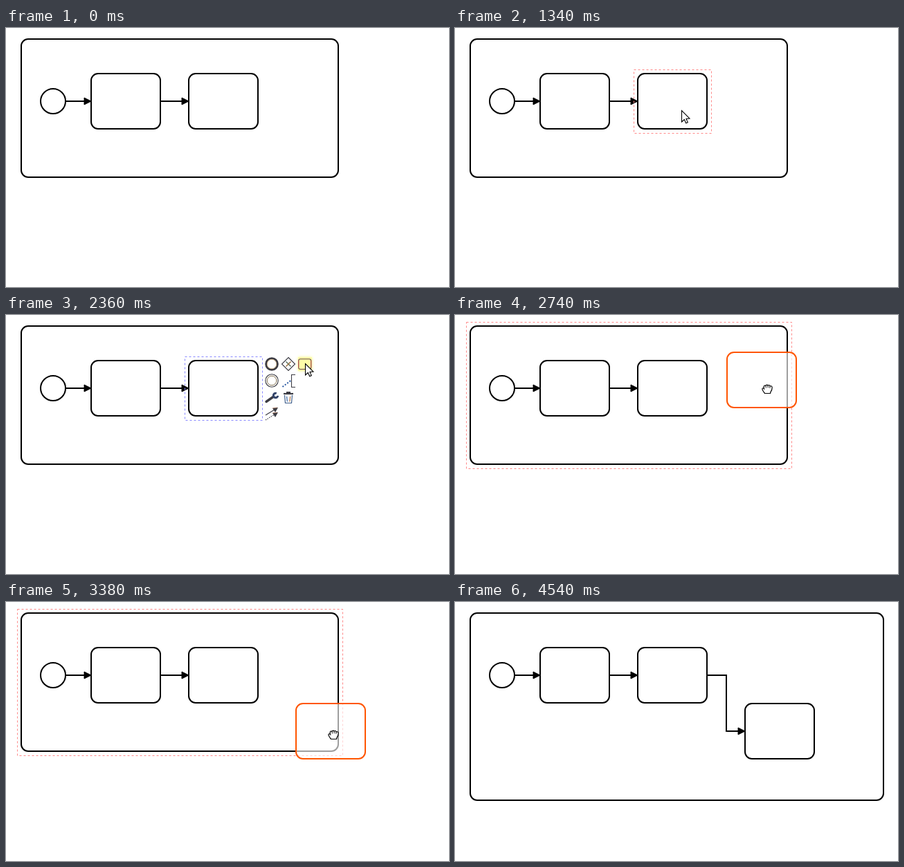
These frames come from a looping animation (640 px wide and 375 px high, 5.82 s). An HTML page with a canvas:

```html
<!DOCTYPE html>
<html lang="en">
<head>
<meta charset="utf-8">
<title>Diagram editing</title>
<style>
html, body { margin: 0; width: 100%; height: 100%; overflow: hidden; background: #fff; }
canvas { display: block; }
</style>
</head>
<body>
<canvas id="stage" width="640" height="375"></canvas>
<script>
const ctx = document.getElementById('stage').getContext('2d');
const LOOP = 5820, SELECT = 1720, DRAG = 2580, DROP = 3800, CLEAR = 4540;
const INK = '#3c3c44', RED = '#ff8888', BLUE = '#8888ff', ORANGE = '#ff5500';

const box = (x, y, w, h) => ({ x, y, w, h });
const first = box(123, 66, 100, 80);
const second = box(264, 66, 100, 80);
const added = box(419, 147, 100, 80);
const smallFrame = box(22, 16, 458, 200);
const bigFrame = box(22, 16, 597, 271);

// Pointer waypoints: time, x, y, eased arrival
const track = [
  [980, 24, 288], [1540, 348, 107, true], [1720, 348, 107],
  [2200, 436, 74, true], [2280, 435, 73], [2320, 433, 71], [2360, 432, 70],
  [2500, 432, 70], [2540, 433, 72], [2620, 436, 78], [2740, 447, 102],
  [2820, 457, 125], [2900, 464, 147], [2940, 465, 158], [3060, 465, 175],
  [3200, 467, 183], [3340, 469, 187], [3900, 469, 187], [4500, 490, 364, true]
];
// Pointer samples are 40 ms apart, counted from the start of each gesture
const gestures = [980, 1720, 2540, 3800, 3900];

function sampleTime(t) {
  let start = 0;
  for (const g of gestures) if (t >= g) start = g;
  if (start === 3800) return start;
  return start + Math.floor((t - start) / 40) * 40;
}

function ease(u) {
  const v = 1 - Math.pow(1 - u, 1.8);
  return v * v * (3 - 2 * v);
}

function pointer(t) {
  let i = 1;
  while (i < track.length - 1 && track[i][0] < t) i++;
  const a = track[i - 1], b = track[i];
  let u = Math.min(1, Math.max(0, (t - a[0]) / (b[0] - a[0])));
  if (b[3]) u = ease(u);
  return {
    x: Math.round(a[1] + (b[1] - a[1]) * u),
    y: Math.round(a[2] + (b[2] - a[2]) * u)
  };
}

const inside = (p, b) => p.x >= b.x && p.x <= b.x + b.w && p.y >= b.y && p.y <= b.y + b.h;

function trace(points, close) {
  ctx.beginPath();
  points.forEach(([x, y], i) => i ? ctx.lineTo(x, y) : ctx.moveTo(x, y));
  if (close) ctx.closePath();
}

function line(points, color = '#000', width = 2, dash = []) {
  ctx.strokeStyle = color;
  ctx.lineWidth = width;
  ctx.setLineDash(dash);
  trace(points);
  ctx.stroke();
  ctx.setLineDash([]);
}

function ring(x, y, r, width, color = '#000') {
  ctx.strokeStyle = color;
  ctx.lineWidth = width;
  ctx.beginPath();
  ctx.arc(x, y, r, 0, Math.PI * 2);
  ctx.stroke();
}

function rounded(b, fill, stroke = '#000', width = 2, r = 10) {
  ctx.beginPath();
  ctx.roundRect(b.x, b.y, b.w, b.h, r);
  if (fill) {
    ctx.fillStyle = fill;
    ctx.fill();
  }
  ctx.strokeStyle = stroke;
  ctx.lineWidth = width;
  ctx.stroke();
}

function outline(b, color) {
  ctx.strokeStyle = color;
  ctx.lineWidth = 1;
  ctx.setLineDash([3, 3]);
  ctx.strokeRect(b.x - 5.5, b.y - 5.5, b.w + 12, b.h + 12);
  ctx.setLineDash([]);
}

function flow(points) {
  line(points);
  const [x, y] = points[points.length - 1];
  trace([[x - 10, y - 5], [x, y], [x - 10, y + 5]], true);
  ctx.fillStyle = '#000';
  ctx.fill();
  ctx.lineWidth = 1;
  ctx.stroke();
}

function smallArrow(y, dash) {
  line([[375, y], [388, y - 8]], INK, 1.2, dash);
  trace([[393, y - 11], [385, y - 10], [389, y - 4]], true);
  ctx.fillStyle = INK;
  ctx.fill();
  line([[385, y - 10], [392, y - 11]], '#a66b4a', 0.7);
}

function wrench() {
  ctx.lineCap = 'round';
  line([[376, 125.5], [386, 118.5]], INK, 3.4);
  ctx.lineCap = 'butt';
  ctx.strokeStyle = '#34456b';
  ctx.lineWidth = 3;
  ctx.beginPath();
  ctx.arc(389.5, 116.5, 3.2, 0.1, 5.1);
  ctx.stroke();
}

function trash() {
  line([[401, 114], [415, 114]], INK, 2.2);
  line([[405, 112], [411, 112]], INK, 2);
  line([[402.5, 116], [403.5, 127.5], [412.5, 127.5], [413.5, 116]], '#41608c', 1.2);
  line([[405.6, 118], [406.4, 125.5]], '#3768a8', 1.2);
  line([[410.6, 118], [409.8, 125.5]], '#b8723c', 1.2);
}

// Icons are laid out beside the second task; other owners shift them
function contextPad(owner, p) {
  const dx = owner.x - second.x, dy = owner.y - second.y;
  ctx.save();
  ctx.translate(dx, dy);
  const col = Math.floor((p.x - dx - 372) / 24);
  const row = Math.floor((p.y - dy - 59) / 24);
  const counts = [3, 2, 2, 1];
  if (col >= 0 && row >= 0 && row < 4 && col < counts[row]) {
    ctx.fillStyle = '#ffffa8';
    ctx.shadowColor = '#ffff90';
    ctx.shadowBlur = 4;
    ctx.fillRect(374 + col * 24, 61 + row * 24, 20, 20);
    ctx.shadowBlur = 0;
    ctx.shadowColor = 'transparent';
  }
  ring(384, 71, 8.4, 2.8, INK);
  ring(384, 71, 6.7, 0.6, '#c9a060');

  trace([[408, 61.5], [417.5, 71], [408, 80.5], [398.5, 71]], true);
  ctx.strokeStyle = INK;
  ctx.lineWidth = 1.1;
  ctx.stroke();
  line([[404.5, 67.5], [411.5, 74.5]], '#557060', 1.4);
  line([[411.5, 67.5], [404.5, 74.5]], '#9a7040', 1.4);

  rounded(box(422.7, 63.7, 18, 14.8), null, '#684848', 1.1, 2.5);
  line([[422.7, 66], [422.7, 76]], '#b84c4c', 1);
  line([[440.7, 66], [440.7, 76]], '#b84c4c', 1);

  ring(384, 95, 9.2, 1.1, INK);
  ring(384, 95, 6.8, 1, '#81704f');

  line([[418, 86.5], [412.5, 86.5], [412.5, 104.5], [418, 104.5]], INK, 1.1);
  line([[399.5, 104], [412, 94.5]], '#2857a0', 2, [2, 2.2]);
  wrench();
  trash();
  smallArrow(145, []);
  smallArrow(152, [1.5, 1.5]);
  ctx.restore();
}

function arrowCursor(p) {
  ctx.save();
  ctx.translate(p.x + 0.5, p.y + 0.5);
  trace([[0, 0], [0, 16.5], [3.8, 13], [6.2, 18.2], [8.8, 17.1], [6.5, 12], [11.5, 11.6]], true);
  ctx.fillStyle = '#fff';
  ctx.fill();
  ctx.strokeStyle = '#000';
  ctx.lineWidth = 1.1;
  ctx.stroke();
  ctx.restore();
}

function handCursor(p) {
  ctx.save();
  ctx.translate(p.x - 4, p.y - 2);
  ctx.beginPath();
  ctx.moveTo(4.5, 13.5);
  ctx.quadraticCurveTo(1.5, 10, 0.8, 7.2);
  ctx.quadraticCurveTo(1, 5.2, 3.3, 6.2);
  ctx.lineTo(3.2, 3.5);
  ctx.quadraticCurveTo(4, 1.2, 6, 2.4);
  ctx.quadraticCurveTo(7.5, 0, 9, 2);
  ctx.quadraticCurveTo(11, 0.6, 12, 3);
  ctx.quadraticCurveTo(14.8, 2, 15.2, 5);
  ctx.quadraticCurveTo(15.2, 8.5, 13, 11.3);
  ctx.lineTo(12.5, 13.5);
  ctx.closePath();
  ctx.fillStyle = '#fff';
  ctx.fill();
  ctx.strokeStyle = '#000';
  ctx.lineWidth = 1.2;
  ctx.lineJoin = 'round';
  ctx.stroke();
  line([[6, 2.5], [6.3, 5.5]], '#000', 1);
  line([[9, 2], [9.2, 5.3]], '#000', 1);
  line([[12, 3], [11.9, 5.8]], '#000', 1);
  line([[3.3, 6], [4, 8]], '#000', 1);
  ctx.restore();
}

function dragPreview(t) {
  const c = pointer(t - 40);
  if (Math.abs(c.y - 106) <= 7) {
    c.y = 106;
    line([[0, 106.5], [640, 106.5]], 'rgba(255,195,66,0.5)', 1);
  }
  rounded(box(c.x - 50, c.y - 40, 100, 80), 'rgba(255,255,255,0.62)', ORANGE);
}

function draw(time) {
  const t = sampleTime(time);
  const dropped = t >= DROP;
  const dragging = t >= DRAG && !dropped;
  const active = t >= 980 && t < CLEAR;
  const frame = dropped ? bigFrame : smallFrame;
  const p = pointer(t);

  ctx.fillStyle = '#fff';
  ctx.fillRect(0, 0, 640, 375);

  rounded(frame);
  ring(68, 106, 18, 2);
  [first, second].forEach(b => rounded(b));
  if (dropped) rounded(added);
  flow([[86, 106], [123, 106]]);
  flow([[223, 106], [264, 106]]);
  if (dropped) flow([[364, 106], [392, 106], [392, 187], [419, 187]]);
  if (!active) return;

  const selected = dropped ? added : t >= SELECT && !dragging ? second : null;
  const overPad = selected && inside(p, box(selected.x + 108, selected.y - 7, 72, 96));
  let hover = null;
  if (!overPad) {
    const shapes = dropped ? [added, second, first, frame] : [second, first, frame];
    hover = shapes.find(b => inside(p, b));
  }
  if (selected && selected !== hover) outline(selected, BLUE);
  if (hover) outline(hover, RED);
  if (selected) contextPad(selected, p);

  if (dragging) {
    dragPreview(t);
    handCursor(p);
  } else {
    arrowCursor(p);
  }
}

const begin = performance.now();
function tick() {
  draw((performance.now() - begin) % LOOP);
  requestAnimationFrame(tick);
}
tick();
</script>
</body>
</html>
```
